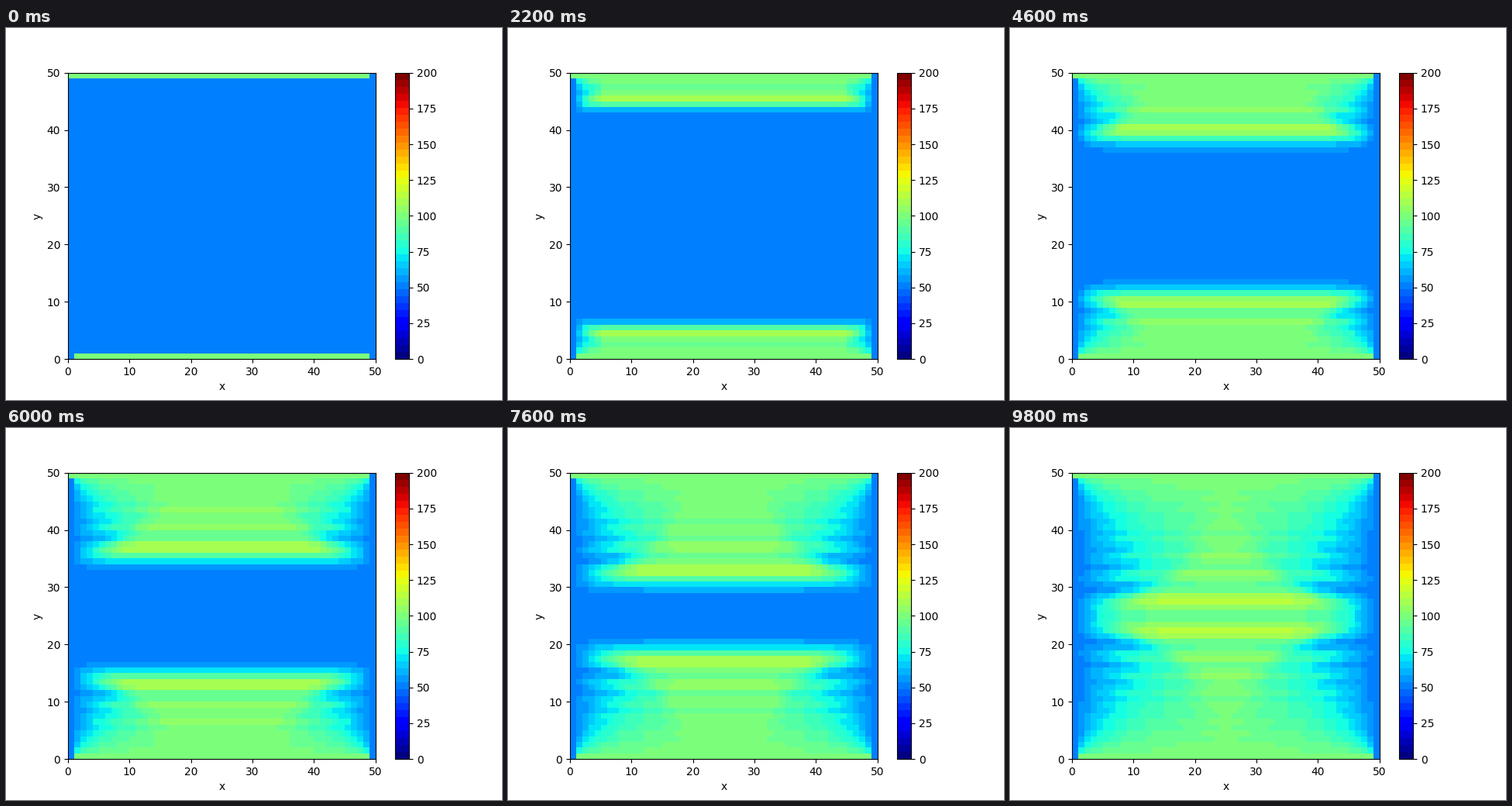
A matplotlib script that plays this animation: 640 px wide and 480 px high, repeating every 10000 ms.

```python
import numpy as np
import matplotlib.pyplot as plt
from matplotlib.animation import FuncAnimation

SIZE = 50        # cells per side
STEPS = 50       # time steps in one loop
GAMMA = 0.25     # squared Courant number
SIDE, EDGE = 50.0, 100.0


def start_field():
    u = np.full((SIZE, SIZE), SIDE)
    u[-1, :-1] = EDGE
    u[0, 1:-1] = EDGE
    return u


def solve_wave():
    """Explicit 2D wave equation, at rest at first, with fixed borders."""
    prev = start_field()
    now = prev.copy()
    fields = [now]
    for _ in range(STEPS - 1):
        lap = (now[2:, 1:-1] + now[:-2, 1:-1] + now[1:-1, 2:]
               + now[1:-1, :-2] - 4 * now[1:-1, 1:-1])
        new = now.copy()
        new[1:-1, 1:-1] += now[1:-1, 1:-1] - prev[1:-1, 1:-1] + GAMMA * lap
        prev, now = now, new
        fields.append(now)
    return fields


fields = solve_wave()

fig, ax = plt.subplots(figsize=(6.4, 4.8), dpi=100)
mesh = ax.pcolormesh(fields[0], cmap=plt.get_cmap("jet", 41), vmin=0, vmax=200)
ax.set_xlabel("x")
ax.set_ylabel("y")
fig.colorbar(mesh, ax=ax, ticks=range(0, 201, 25))


def draw(i):
    mesh.set_array(fields[i])
    return [mesh]


anim = FuncAnimation(fig, draw, frames=STEPS, interval=200,
                     repeat=True, repeat_delay=0)
plt.show()
```
